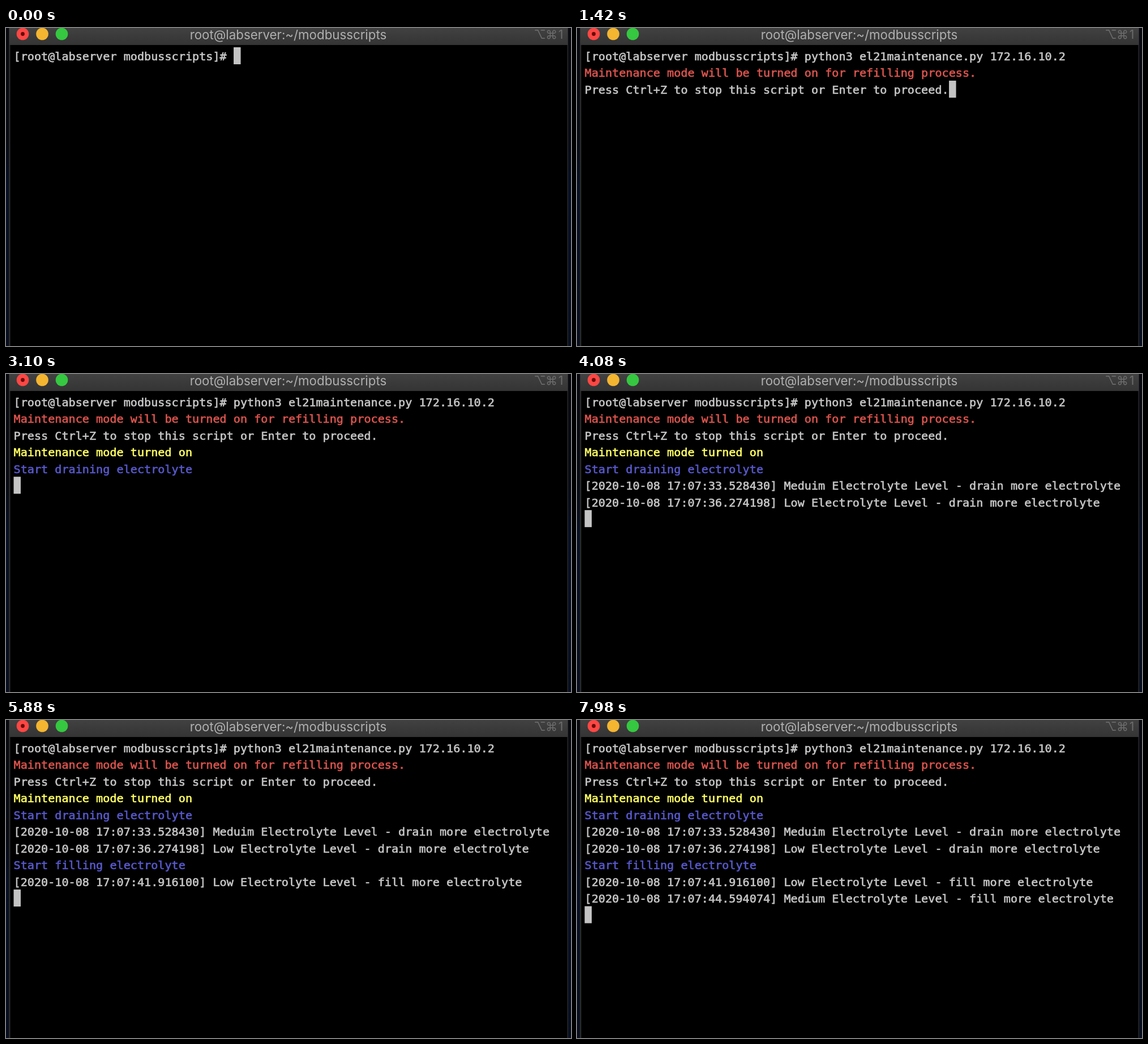
An HTML page for the animation above (8000 ms loop, 998 by 561 pixels).

```html
<!DOCTYPE html>
<html lang="en">
<head>
<meta charset="utf-8">
<title>Maintenance script in a terminal</title>
<style>
  html, body { margin: 0; width: 100%; height: 100%; overflow: hidden; background: #000; }
  svg { display: block; width: 100vw; height: 100vh; }
  .title { font: 22.3px Inter, "Liberation Sans", sans-serif; fill: #b0b0b0; text-anchor: middle; }
  .keys { font: 21px Inter, "DejaVu Sans", sans-serif; fill: #6c6c6c; text-anchor: middle; }
  .row { font: 20.17px "DejaVu Sans Mono", monospace; white-space: pre; stroke-width: .65px; }
</style>
</head>
<body>
<svg viewBox="0 0 998 561" preserveAspectRatio="none">
  <defs>
    <linearGradient id="bar" x2="0" y2="1">
      <stop stop-color="#414141"/><stop offset="1" stop-color="#343434"/>
    </linearGradient>
    <linearGradient id="desk" x2="0" y2="1">
      <stop stop-color="#08080f"/><stop offset=".35" stop-color="#080b14"/>
      <stop offset=".5" stop-color="#071026"/><stop offset="1" stop-color="#080e20"/>
    </linearGradient>
  </defs>
  <rect width="998" height="561" fill="url(#desk)"/>
  <rect x="5" width="988" height="561" fill="#2a2a2a"/>
  <rect x="7.5" width="984" height="561" fill="#000"/>
  <rect x="6" width="986" height="30" fill="url(#bar)"/>
  <circle cx="29.5" cy="10.5" r="10.8" fill="#fc4744"/>
  <circle cx="29.5" cy="10.5" r="3.4" fill="#650b08"/>
  <circle cx="64" cy="10.5" r="10.8" fill="#f4b530"/>
  <circle cx="98.5" cy="10.5" r="10.8" fill="#35c840"/>
  <text class="title" x="498.5" y="19.5">root@labserver:~/modbusscripts</text>
  <g class="keys">
    <text x="943" y="19">⌥</text><text x="963.5" y="19">⌘</text><text x="980" y="19">1</text>
  </g>
  <g id="screen"></g>
  <rect id="cursor" width="12.5" height="30" fill="#c4c4c4"/>
</svg>
<script>
const LOOP = 8000, LEFT = 13.5, TOP = 34, CELL = 12.143, LINE = 29.45;
const GREY = '#c6c6c6', RED = '#dc544e', YELLOW = '#ffff62', BLUE = '#5858cc';

const PROMPT = '[root@labserver modbusscripts]# ';
const COMMAND = 'python3 el21maintenance.py 172.16.10.2';
const TYPE_START = 200, TYPE_END = 950;

// Each line: time it appears, colour, text.
const LINES = [
  [0, GREY, PROMPT],
  [1140, RED, 'Maintenance mode will be turned on for refilling process.'],
  [1140, GREY, 'Press Ctrl+Z to stop this script or Enter to proceed.'],
  [2240, YELLOW, 'Maintenance mode turned on'],
  [2320, BLUE, 'Start draining electrolyte'],
  [3200, GREY, '[2020-10-08 17:07:33.528430] Meduim Electrolyte Level - drain more electrolyte'],
  [4070, GREY, '[2020-10-08 17:07:36.274198] Low Electrolyte Level - drain more electrolyte'],
  [4940, BLUE, 'Start filling electrolyte'],
  [5860, GREY, '[2020-10-08 17:07:41.916100] Low Electrolyte Level - fill more electrolyte'],
  [6710, GREY, '[2020-10-08 17:07:44.594074] Medium Electrolyte Level - fill more electrolyte'],
];
const INPUT_ROW = 2; // the cursor waits at the end of this line

const screen = document.getElementById('screen');
const cursor = document.getElementById('cursor');

const rows = LINES.map(([, colour, text], i) => {
  const row = document.createElementNS('http://www.w3.org/2000/svg', 'text');
  row.setAttribute('class', 'row');
  row.setAttribute('x', LEFT);
  row.setAttribute('y', TOP + 23 + i * LINE);
  row.setAttribute('fill', colour);
  row.setAttribute('stroke', colour);
  row.textContent = text;
  return screen.appendChild(row);
});

function draw(time) {
  const typed = Math.min(1, Math.max(0, (time - TYPE_START) / (TYPE_END - TYPE_START)));
  const commandLine = PROMPT + COMMAND.slice(0, Math.floor(typed * COMMAND.length));
  rows[0].textContent = commandLine;

  const shown = LINES.filter(([start]) => time >= start).length;
  rows.forEach((row, i) => row.setAttribute('visibility', i < shown ? 'visible' : 'hidden'));

  const last = shown - 1;
  let column = 0, line = shown;
  if (last === 0) [column, line] = [commandLine.length, 0];
  else if (last === INPUT_ROW) [column, line] = [LINES[last][2].length, last];
  cursor.setAttribute('x', LEFT + column * CELL);
  cursor.setAttribute('y', TOP + line * LINE);
}

const begin = performance.now();
function tick() {
  draw((performance.now() - begin) % LOOP);
  requestAnimationFrame(tick);
}
draw(0);
requestAnimationFrame(tick);
</script>
</body>
</html>
```
